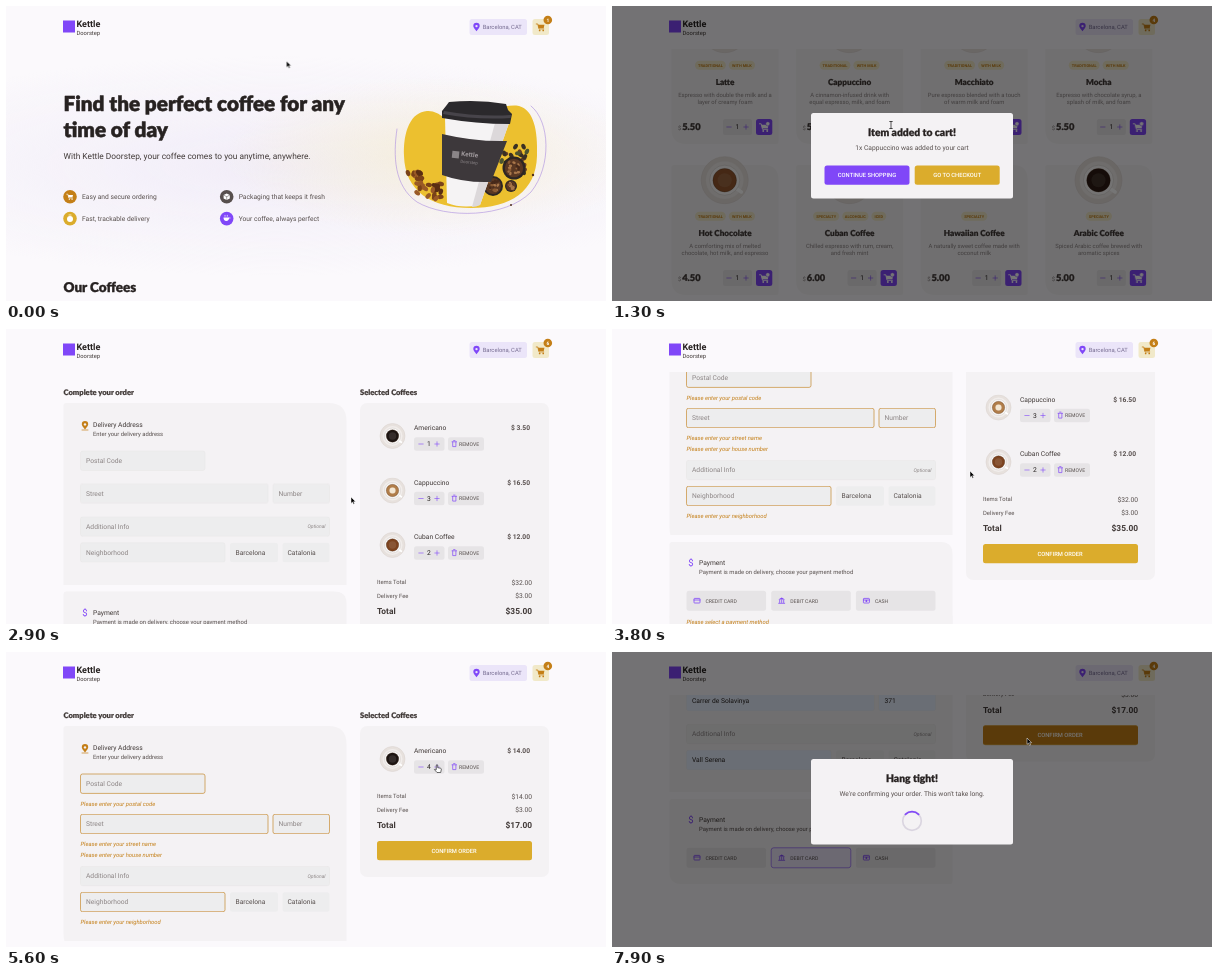
Write an HTML page that moves like this. It is 600x295 px and loops after 8 s.

```html
<!DOCTYPE html>
<html lang="en">
<head>
<meta charset="utf-8">
<title>Coffee shop checkout</title>
<style>
html, body { margin: 0; width: 100%; height: 100%; overflow: hidden; background: #fbf9fc; }
svg { display: block; width: 100vw; height: 100vh; }
text { font-family: Roboto, Arial, sans-serif; text-rendering: geometricPrecision; white-space: pre; }
.h { font-family: Lato, "Open Sans", sans-serif; font-weight: 900; stroke-width: .025em; stroke-linejoin: round; }
.b { font-weight: 700; }
.md { font-weight: 500; }
.i { font-style: italic; }
.c { text-anchor: middle; }
.e { text-anchor: end; }
.spin { animation: spin 1s linear infinite; }
@keyframes spin { to { transform: rotate(360deg); } }
</style>
</head>
<body>
<svg id="stage" viewBox="0 0 600 295" preserveAspectRatio="none"></svg>
<script>
const LOOP = 8000;
const BG = '#fbf9fc', CARD = '#f4f2f4', INPUT = '#ededee', BUTTON = '#e6e4e6', FILLED = '#e8f0fe';
const INK = '#272221', SUB = '#403937', BODY = '#574f4d', LABEL = '#8d8686';
const PURPLE = '#8047f8', DEEP = '#4b2995', LILAC = '#ebe5f9';
const GOLD = '#dbac2c', AMBER = '#c47f17', CREAM = '#f1e9c9';

// Timeline helpers: each returns a class name bound to generated keyframes.
let css = '', count = 0;
const track = (prop, stops, ease = 'step-end') => {
  const k = 'k' + count++;
  const body = stops.map(([t, v]) => `${t / LOOP * 100}%{${prop}:${v}}`).join('');
  css += `@keyframes ${k}{${body}}.${k}{animation:${k} ${LOOP}ms ${ease} infinite}`;
  return k;
};
const on = (from, to = LOOP) => track('opacity', [[0, 0], [from, 1], [to, 0]]);
const move = (stops, ease) => {
  const all = [...stops, [LOOP, ...stops.at(-1).slice(1)]];
  return track('transform', all.map(([t, x, y]) => [t, `translate(${x}px,${y}px)`]), ease);
};
const shift = (...stops) => move(stops.map(([t, y]) => [t, 0, y]), 'step-end');

// Drawing helpers
const g = (cls, ...kids) => `<g class="${cls}">${kids.join('')}</g>`;
const at = (x, y, ...kids) => `<g transform="translate(${x} ${y})">${kids.join('')}</g>`;
const text = (x, y, s, size, fill = BODY, cls = '') =>
  `<text x="${x}" y="${y}" font-size="${size}" fill="${fill}" class="${cls}">${s}</text>`;
const title = (x, y, s, size, fill = INK, cls = '') =>
  `<g stroke="${fill}">${text(x, y, s, size, fill, 'h ' + cls)}</g>`;
const box = (x, y, w, h, fill, more = '', r = 2.5) =>
  `<rect x="${x}" y="${y}" width="${w}" height="${h}" rx="${r}" fill="${fill}" ${more}/>`;
const dot = (x, y, r, fill, more = '') => `<circle cx="${x}" cy="${y}" r="${r}" fill="${fill}" ${more}/>`;
const path = (d, fill, more = '') => `<path d="${d}" fill="${fill}" ${more}/>`;
const line = (d, color, w = .8) => path(d, 'none', `stroke="${color}" stroke-width="${w}" stroke-linecap="round" stroke-linejoin="round"`);
const swap = (list, draw) => list.map(([t, s], i) =>
  g(on(t, list[i + 1] ? list[i + 1][0] : LOOP), draw(s))).join('');

const panel = (x, y, w, h, r) => path(
  `M${x + 2.5} ${y}H${x + w - r}q${r} 0 ${r} ${r}V${y + h - 2.5}q0 2.5-2.5 2.5H${x + r}q${-r} 0 ${-r} ${-r}V${y + 2.5}q0-2.5 2.5-2.5z`, CARD);
const cart = (x, y, fill, s = 1) => `<g transform="translate(${x} ${y}) scale(${s})">` +
  line('M-5-3.8h1.8L-1.8 2h5.6', fill, 1) + path('M-3-2.8h7.6L3.8 1h-6z', fill) +
  dot(-1, 3.8, 1, fill) + dot(3.2, 3.8, 1, fill) + '</g>';
const pin = (x, y, fill, hole) => at(x, y,
  path('M0 4C-2 1.5-3.2.2-3.2-1.2a3.2 3.2 0 0 1 6.4 0C3.2.2 2 1.5 0 4z', fill), dot(0, -1.1, 1.2, hole));
const minus = (x, y) => line(`M${x - 2.2} ${y}h4.4`, PURPLE, .6);
const plus = (x, y) => line(`M${x - 2.2} ${y}h4.4M${x} ${y - 2.2}v4.4`, PURPLE, .6);

const cup = (x, y, r, color, saucer = true) => {
  const d = r / 24, k = saucer ? 1 : 1.15;
  return (saucer ? dot(x, y, r, '#e7e1dd', 'stroke="#d8d1cd" stroke-width=".5"') + dot(x, y, r * .8, '#f1edeb') : '') +
    line(`M${x + 11 * d} ${y + 8 * d}l${6 * d} ${4 * d}`, '#fff', 3.5 * d) +
    dot(x, y, r * .64 * k, '#fcfbfa', 'stroke="#cfc8c4" stroke-width=".5"') +
    dot(x, y, r * .5 * k, color, 'stroke="#40220f" stroke-opacity=".35" stroke-width=".8"') +
    dot(x, y, r * .3 * k, '#fff', 'opacity=".1"');
};

// Header
const badge = [[0, 1], [1050, 4], [2500, 6], [4600, 3], [4900, 1], [5100, 2], [5250, 3], [5400, 4]];
const header = box(0, 0, 600, 43, BG, '', 0) + box(57, 14.5, 12, 12, PURPLE, '', 0) +
  text(70.5, 20.5, 'Kettle', 9, INK, 'b') + text(70.5, 28.5, 'Doorstep', 5.8, SUB) +
  box(463.5, 13, 57.5, 16, LILAC) + pin(470.5, 21.2, PURPLE, LILAC) + text(476.7, 23.3, 'Barcelona, CAT', 5.8, '#776d92') +
  box(526.5, 13, 16.5, 16, CREAM) + cart(534.5, 21.2, AMBER, .85) + dot(541.8, 14, 4.3, AMBER) +
  swap(badge, s => text(541.8, 15.8, s, 4.8, '#fff', 'b c'));

// Hero
let seed = 7;
const rand = () => (seed = seed * 16807 % 2147483647) / 2147483647;
const beans = (n, x, y, w, h, tones, r = 3.2) => Array.from({ length: n }, () => {
  const bx = x + (rand() - .5) * w, by = y + (rand() - .5) * h;
  return `<ellipse cx="${bx}" cy="${by}" rx="${r}" ry="${r * .68}" transform="rotate(${rand() * 180} ${bx} ${by})" fill="${tones[rand() * tones.length | 0]}"/>`;
}).join('');
const ROAST = ['#7a4218', '#9a5a26', '#5a2e12'];
const bowl = (x, y, r) => dot(x, y, r, '#2d2624') + dot(x, y, r * .8, '#5a3823') +
  beans(16, x, y, r, r, ['#8a5a33', '#46291a', '#a8764a'], 1.8);

const cupPhoto =
  path('M398 150C397 125 405 106 421 105C437 104 441 122 460 116C485 104 500 98 513 100C528 104 532 125 531 150C530 185 505 202 465 202C425 202 399 185 398 150z', '#ecc02f') +
  line('M391 123C387 150 388 180 411 196C440 213 500 212 525 186C546 160 544 115 525 100', '#a98be0', .6) +
  beans(26, 502, 154, 38, 30, ['#4d5430', '#3a3024', '#6d4326', '#2f3a22'], 3) +
  bowl(508, 162, 11.5) + bowl(487, 180, 10) + bowl(505, 180, 6) +
  dot(527, 169, 1.2, '#50301d') + dot(505, 199, 1, '#50301d') +
  path('M439 111L503 117L474 199Q456 203 441 197z', '#f5f3f4') +
  path('M489 117L503 117L474 199Q470 201 466 201z', '#dcd8da') +
  path('M436 128Q470 136 501 135L485 176Q458 177 436 169z', '#3d383b') +
  path('M440 100L443 96Q472 93 500 98L502 104L506 108L504 118Q470 118 436 112L436 105z', '#2b292c') +
  path('M438 105Q472 111 505 109L504.5 112Q470 114 437 108z', '#47444a') +
  `<g transform="rotate(6 457 150)">${box(446, 146, 7, 7, '#8b8588', '', 0)}${text(455, 150, 'Kettle', 6.4, '#a09a9d', 'b')}${text(455, 157, 'Doorstep', 4.3, '#8b8588')}</g>` +
  beans(10, 409, 170, 14, 8, ROAST) + beans(22, 423, 185, 26, 16, ROAST);

const feature = (x, y, color, icon, s) => dot(x, y, 6.8, color) + icon + text(x + 12, y + 2.4, s, 6.7);
const hero = `<defs>
  <radialGradient id="lav"><stop stop-color="#efeaf7" stop-opacity=".8"/><stop offset="1" stop-color="#efeaf7" stop-opacity="0"/></radialGradient>
  <radialGradient id="sun"><stop stop-color="#f6ecc8" stop-opacity=".6"/><stop offset="1" stop-color="#f6ecc8" stop-opacity="0"/></radialGradient></defs>
  <ellipse cx="270" cy="160" rx="460" ry="110" fill="url(#lav)"/><ellipse cx="430" cy="150" rx="210" ry="80" fill="url(#sun)"/>` +
  title(57.5, 105, 'Find the perfect coffee for any', 20.7) + title(57.5, 131, 'time of day', 20.7) +
  text(57.5, 153.2, 'With Kettle Doorstep, your coffee comes to you anytime, anywhere.', 8.35, SUB) +
  feature(64, 190.7, AMBER, cart(64, 190.7, '#fff', .65), 'Easy and secure ordering') +
  feature(220.7, 190.7, BODY, path('M217.6 189l3.1-1.6 3.1 1.6v3.4l-3.1 1.6-3.1-1.6z', '#fff') + line('M217.8 189.2l2.9 1.5 2.9-1.5M220.7 190.7v3', BODY, .5), 'Packaging that keeps it fresh') +
  feature(64, 212.6, GOLD, dot(64, 213, 3, '#fff') + line('M63 209h2M64 213l1-1.4', '#fff', .7), 'Fast, trackable delivery') +
  feature(220.7, 212.6, PURPLE, path('M217.5 211.5h5.6a2.8 3.4 0 0 1-5.6 0z', '#fff') + line('M219 209.3v1M221.3 209.3v1M223.2 212h.9', '#fff', .7), 'Your coffee, always perfect') +
  cupPhoto + title(57.5, 285.5, 'Our Coffees', 13.5);

// Coffee list
const MILK = ['TRADITIONAL', 'WITH MILK'];
const coffees = [
  ['Espresso', '3.00', '#3b2115', ['TRADITIONAL'], 'Classic coffee made with hot', 'water and ground beans'],
  ['Americano', '3.50', '#1d1512', ['TRADITIONAL'], 'Diluted espresso, milder than', 'the classic one'],
  ['Creamy Espresso', '4.00', '#8b5a30', ['TRADITIONAL'], 'Classic espresso with a', 'layer of creamy foam'],
  ['Iced Espresso', '4.00', '#5a3520', ['TRADITIONAL', 'ICED'], 'Drink prepared with espresso', 'and ice cubes'],
  ['Latte', '5.50', '#c39a68', MILK, 'Espresso with double the milk and a', 'layer of creamy foam'],
  ['Cappuccino', '5.50', '#b07c48', MILK, 'A cinnamon-infused drink with', 'equal espresso, milk, and foam'],
  ['Macchiato', '5.00', '#a87846', MILK, 'Pure espresso blended with a touch', 'of warm milk and foam'],
  ['Mocha', '5.50', '#75452a', MILK, 'Espresso with chocolate syrup, a', 'splash of milk, and foam'],
  ['Hot Chocolate', '4.50', '#96582e', MILK, 'A comforting mix of melted', 'chocolate, hot milk, and espresso'],
  ['Cuban Coffee', '6.00', '#7c431f', ['SPECIALTY', 'ALCOHOLIC', 'ICED'], 'Chilled espresso with rum, cream,', 'and fresh mint'],
  ['Hawaiian Coffee', '5.00', '#a68d45', ['SPECIALTY'], 'A naturally sweet coffee made with', 'coconut milk'],
  ['Arabic Coffee', '5.00', '#2e1c14', ['SPECIALTY'], 'Spiced Arabic coffee brewed with', 'aromatic spices'],
  ['', '', '#e9e4df'], ['', '', '#e6d5ae']
];
const tagRow = tags => {
  const w = s => s.length * 2.3 + 5.5;
  let x = -(tags.reduce((a, s) => a + w(s), 0) + 3 * (tags.length - 1)) / 2;
  return tags.map(s => {
    const out = box(x, 30.8, w(s), 9, CREAM, '', 4.5) + text(x + w(s) / 2, 36.8, s, 3.9, AMBER, 'b c');
    x += w(s) + 3;
    return out;
  }).join('');
};
const product = ([name, price, color, tags, a, b], i) => {
  const x = 113 + i % 4 * 124.6, y = 334 + (i / 4 | 0) * 151;
  const base = panel(-53.5, -16, 107, 130, 15) + cup(-.3, -.8, 23.5, color, name !== 'Hawaiian Coffee');
  if (!name) return at(x, y, base);
  const cuban = name === 'Cuban Coffee';
  const qty = cuban ? [[0, 1], [2050, 2], [2500, 1]] : [[0, 1]];
  return at(x, y, base, tagRow(tags),
    title(0, 54.5, name, 8.2, SUB, 'c'), text(0, 67, a, 5.87, LABEL, 'c'), text(0, 74.2, b, 5.87, LABEL, 'c'),
    text(-47, 100.4, '$', 5.87, LABEL), title(-42.8, 100.2, price, 9.3, SUB),
    box(-2, 89, 29, 16, BUTTON), minus(4, 97), plus(21, 97),
    swap(qty, s => text(12.5, 99.4, s, 6.7, INK, 'c')),
    box(31, 89, 16.3, 16, PURPLE), cuban ? g(on(2150, 2500), box(31, 89, 16.3, 16, DEEP)) : '',
    cart(39.2, 97.4, '#fff', .95), dot(42.8, 93.8, 2.1, '#fff', `stroke="${PURPLE}" stroke-width=".5"`));
};
const tooltip = g(on(2200, 2500), at(0, 517, box(259.5, 228, 34.8, 13, '#3a3638'), text(276.8, 236.3, 'Add to cart', 5.1, '#fff', 'c')));
const home = g(on(0, 2900), g(move([[0, 0, 0], [300, 0, 0], [1000, 0, -461], [1700, 0, -461], [1950, 0, -517]], 'ease-in-out'),
  hero, ...coffees.map(product), tooltip));

// Checkout form
const ERR = 3500, FILL = 6150, PICK = 6700;
const field = (x, cy, w, hint, err, value) =>
  box(x, cy - 9.7, w, 19.4, INPUT, 'stroke="#e6e5e5" stroke-width=".5"', 2) +
  (err ? g(err, box(x, cy - 9.7, w, 19.4, 'none', `stroke="${AMBER}" stroke-width=".6"`, 2)) : '') +
  (value ? g(on(0, value[0]), text(x + 5.5, cy + 2.3, hint, 6.7, LABEL)) +
    g(on(value[0]), box(x, cy - 9.7, w, 19.4, FILLED, '', 2), swap([value], s => text(x + 5.5, cy + 2.3, s, 6.7, INK)))
    : text(x + 5.5, cy + 2.3, hint, 6.7, LABEL));
const fault = (y, s) => text(74.5, y, s, 5.87, AMBER, 'i');
const errA = on(ERR, FILL), errN = on(ERR, PICK);
const street = g(shift([0, -7.5], [ERR, 0], [FILL, -7.5]),
  field(74.5, 172, 187.5, 'Street', errA, [FILL, 'Carrer de Solavinya']),
  field(267, 172, 56.5, 'Number', errA, [FILL, '371']),
  g(errA, fault(194, 'Please enter your street name'), fault(205, 'Please enter your house number')));
const area = g(shift([0, -26.5], [ERR, 0], [FILL, -26.5]),
  field(74.5, 224, 249, 'Additional Info'), text(319.5, 225.8, 'Optional', 5, LABEL, 'i e'),
  field(74.5, 250, 144.5, 'Neighborhood', errN),
  g(on(6400), box(74.5, 240.3, 144.5, 19.4, FILLED)),
  g(on(6400, 6500), text(80, 252.3, 'Neighborhood', 6.7, LABEL)),
  g(on(6400, PICK), box(74.5, 240.3, 144.5, 19.4, 'none', `stroke="${GOLD}" stroke-width=".8"`, 2)),
  swap([[6500, 'Vall Serena']], s => g(on(0, PICK), text(80, 252.1, s, 5.6, INK)) + g(on(PICK), text(80, 252.3, s, 6.7, INK))),
  box(224, 240.3, 48, 19.4, INPUT), text(229.5, 252.3, 'Barcelona', 6.7),
  box(276.5, 240.3, 47, 19.4, INPUT), text(281.5, 252.3, 'Catalonia', 6.7),
  g(errN, fault(272, 'Please enter your neighborhood')));

const cardIcon = x => box(x - 3, 352.4, 6, 4.6, 'none', `stroke="${PURPLE}" stroke-width=".8"`, .6) + line(`M${x - 3} 354h6`, PURPLE);
const bankIcon = x => path(`M${x - 3.3} 353.5l3.3-2 3.3 2z`, PURPLE) + line(`M${x - 2} 354v2.5M${x} 354v2.5M${x + 2} 354v2.5M${x - 3} 357.3h6`, PURPLE);
const cashIcon = x => cardIcon(x) + dot(x, 355, 1, PURPLE);
const option = (x, icon, s, extra = '') => box(x, 344.8, 79.6, 20, BUTTON) + extra + icon(x + 10.5) + text(x + 19, 356.6, s, 5.1);
const payment = g(shift([0, -33.5], [ERR, 0], [FILL, -26.5], [PICK, -33.5]),
  box(50, 289, 298, 180, BG, '', 0), panel(57.5, 296, 283, 85, 12),
  g(on(ERR, 7200), box(57.5, 368, 283, 24, CARD)),
  text(79, 320.3, '$', 9.5, PURPLE, 'c'), text(87, 319.3, 'Payment', 6.7, SUB),
  text(87, 328.2, 'Payment is made on delivery, choose your payment method', 5.87),
  option(74.5, cardIcon, 'CREDIT CARD'),
  option(159.2, bankIcon, 'DEBIT CARD', g(on(7200), box(159.2, 344.8, 79.6, 20, LILAC, `stroke="${PURPLE}" stroke-width=".6"`))),
  option(243.9, cashIcon, 'CASH'),
  g(on(ERR, 7200), fault(378, 'Please select a payment method')));
const suggestion = g(on(6500, PICK), box(116, 237, 66, 18.5, '#2b2a2e'), path('M120.5 237.2l4-4 4 4z', '#2b2a2e'),
  text(121, 248.4, 'Vall Serena', 5.8, '#fff', 'md'), line('M170.5 244.5l4 4m0-4l-4 4', '#fff', .6));

// Order summary
const money = n => '$' + n.toFixed(2);
const item = (y, name, color, qtys, price) => at(0, y, cup(386.5, 107, 12.5, color), text(408, 101.3, name, 6.7, SUB),
  box(408, 108.3, 30.5, 13.4, BUTTON), minus(415, 115), plus(431, 115),
  swap(qtys, n => text(423, 117.3, n, 6.7, INK, 'c') + text(524, 101.3, '$ ' + (n * price).toFixed(2), 6.7, BODY, 'b e')),
  box(442, 108.3, 36, 13.4, BUTTON), line('M446 112.8h4.6M446.7 113v4.6h3.2v-4.6M447.6 111.6h1.4', PURPLE, .7),
  text(453, 116.9, 'REMOVE', 5.1));
const sums = [[0, 32], [4600, 15.5], [4900, 3.5], [5100, 7], [5250, 10.5], [5400, 14]];
const hover = cls => g(cls, box(371, 189, 155, 19.3, AMBER));
const summary = `<rect x="354" y="74" width="189" height="151" rx="7" fill="${CARD}" class="${track('height', [[0, '260px'], [4600, '205.5px'], [4900, '151px']])}"/>` +
  item(0, 'Americano', '#1d1512', [[0, 1], [5100, 2], [5250, 3], [5400, 4]], 3.5) +
  g(on(0, 4600), item(54.5, 'Cappuccino', '#b07c48', [[0, 3]], 5.5), dot(386.5, 161.5, 3, '#f3e6d2')) +
  g(on(0, 4900), g(shift([0, 0], [4600, -54.5]), item(109, 'Cuban Coffee', '#7c431f', [[0, 2]], 6))) +
  g(shift([0, 109], [4600, 54.5], [4900, 0]),
    text(371, 146.2, 'Items Total', 5.87), text(371, 159.7, 'Delivery Fee', 5.87), text(526, 160, '$3.00', 6.7, BODY, 'e'),
    text(371, 176.2, 'Total', 8.4, SUB, 'b'),
    swap(sums, n => text(526, 146.5, money(n), 6.7, BODY, 'e') + text(526, 176.2, money(n + 3), 8.4, SUB, 'b e')),
    box(371, 189, 155, 19.3, GOLD), hover(on(3350, 3600)), hover(on(7450)),
    text(448, 200.6, 'CONFIRM ORDER', 5.8, '#fff', 'md c'));

const scroll = [[0, 0], [3050, 0], [3350, -83], [3950, -83], [4300, 0], [5650, 0], [5950, -55.5], [6750, -55.5], [7050, -115.5]];
const checkout = g(on(2900), g(move(scroll.map(([t, y]) => [t, 0, y]), 'ease-in-out'),
  title(57.5, 65.5, 'Complete your order', 7.6, SUB), title(354, 65.5, 'Selected Coffees', 7.6, SUB),
  panel(57.5, 74, 283, 226, 18), pin(79, 96.5, AMBER, CARD), line('M76 101h6', AMBER, .7),
  text(87, 98.3, 'Delivery Address', 6.7, SUB), text(87, 106.7, 'Enter your delivery address', 5.87),
  field(74.5, 131.7, 124.5, 'Postal Code', errA, [FILL, '09973']),
  g(errA, fault(153.8, 'Please enter your postal code')),
  street, area, payment, summary, suggestion));

// Dialogs
const dialog = (cls, heading, message, ...rest) => g(cls, box(0, 0, 600, 295, '#000', 'opacity=".54"', 0),
  box(199, 107, 202, 85.5, CARD), title(300, 130.3, heading, 10.3, INK, 'c'), text(300, 143.8, message, 6.7, BODY, 'c'), ...rest);
const action = (x, color, s) => box(x, 159.5, 85, 19.3, color) + text(x + 42.5, 171.1, s, 5.8, '#fff', 'md c');
const added = (cls, what) => dialog(cls, 'Item added to cart!', what + ' was added to your cart',
  action(212.5, PURPLE, 'CONTINUE SHOPPING'), action(302.7, GOLD, 'GO TO CHECKOUT'));
const spinner = at(300, 169, dot(0, 0, 9.3, 'none', 'stroke="#dad5e0" stroke-width="1.7"'),
  g('spin', `<g transform="rotate(36)">${line('M-6.6-6.6A9.3 9.3 0 0 1 6.6-6.6', PURPLE, 1.7)}</g>`));
const dialogs = added(on(1100, 1700), '1x Cappuccino') + added(on(2500, 2900), '2x Cuban Coffee') +
  dialog(on(7600), 'Hang tight!', 'We\'re confirming your order. This won\'t take long.', spinner);

// Pointer
const shapes = {
  arrow: path('M0 0v6.4l1.5-1.3 1 2.2 1.1-.5-1-2.1h2z', '#000', 'stroke="#fff" stroke-width=".5"'),
  beam: line('M-1.3-3.5h2.6M0-3.5v7M-1.3 3.5h2.6', '#111', .7),
  hand: path('M-.7 0q.7-.9 1.4 0v2.7l3 .6q.8.3.6 1.2l-.6 3h-3.7l-2.6-3q.2-1 1.9.2z', '#fff', 'stroke="#111" stroke-width=".6"')
};
const looks = [[0, 'arrow'], [950, 'hand'], [1150, 'beam'], [1550, 'hand'], [1750, 'arrow'], [1980, 'hand'], [2520, 'arrow'],
  [2720, 'hand'], [2900, 'arrow'], [3300, 'hand'], [3600, 'arrow'], [4350, 'hand'], [5720, 'arrow'], [5900, 'beam'],
  [6520, 'hand'], [6720, 'arrow'], [7050, 'hand'], [7300, 'arrow'], [7450, 'hand'], [7620, 'arrow']];
const route = [[0, 280.5, 55], [300, 281, 58], [900, 279, 119], [1450, 279, 119], [1600, 255, 168], [1750, 255, 168],
  [2000, 258, 215], [2200, 276, 216], [2500, 276, 216], [2800, 345, 168], [2950, 345, 168], [3350, 440, 223],
  [3550, 440, 223], [3750, 358, 142], [4000, 358, 142], [4400, 460, 168], [4900, 460, 168], [5080, 431, 113],
  [5680, 431, 113], [5950, 130, 76], [6250, 130, 76], [6400, 140, 168], [6530, 141, 185], [6720, 141, 185],
  [7080, 200, 204], [7250, 200, 204], [7500, 415, 86]];
const pointer = g(move(route, 'ease-in-out'), swap(looks, s => shapes[s]));

document.getElementById('stage').innerHTML = home + checkout + header + dialogs + pointer;
document.head.appendChild(document.createElement('style')).textContent = css;
</script>
</body>
</html>
```
